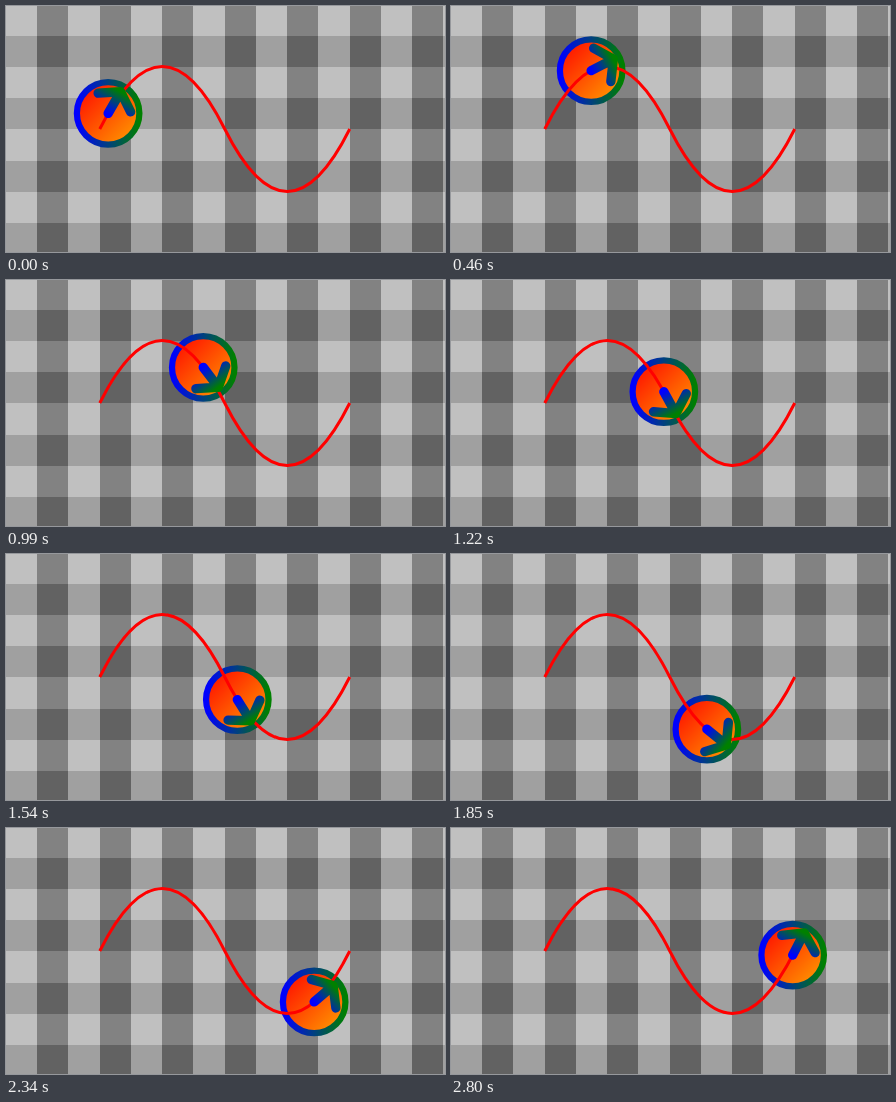
Recreate the animation shown at these times as an HTML page. Size 439 by 246 pixels, loop 2.87 s.

```html
<!DOCTYPE html>
<html lang="en">
<head>
<meta charset="utf-8">
<title>Marker following a path</title>
<style>
  html, body { margin: 0; width: 100%; height: 100%; overflow: hidden; }
  svg {
    display: block;
    width: 100%;
    height: 100%;
    background:
      repeating-linear-gradient(90deg, #000 0 31.25px, #3e3e3e 0 62.5px),
      repeating-linear-gradient(#000 -1.7px 29.55px, #202020 0 60.8px),
      #c0c0c0;
    background-blend-mode: difference;
  }
</style>
</head>
<body>
<svg viewBox="0 0 439 246" preserveAspectRatio="none">
  <defs>
    <linearGradient id="warm" x2="1" y2="1">
      <stop stop-color="red"/>
      <stop offset="1" stop-color="orange"/>
    </linearGradient>
    <linearGradient id="cool">
      <stop stop-color="blue"/>
      <stop offset="1" stop-color="green"/>
    </linearGradient>
  </defs>
  <circle id="disc" r="31.25" fill="url(#warm)" stroke="url(#cool)" stroke-width="6.25"/>
  <path id="track" d="M93.75 123 q62.5 -125 125 0 t125 0" fill="none" stroke="red" stroke-width="3"/>
  <path id="arrow" d="M0 0 H25 M12.5 -18.75 L25 0 L12.5 18.75" fill="none" stroke="url(#cool)"
        stroke-width="9.375" stroke-linecap="round" stroke-linejoin="round"/>
</svg>
<script>
  const LOOP = 2870, STEPS = 37, LEAD = 24;
  const FIRST = 0.048, STRIDE = 0.0261;

  const [disc, track, arrow] = ['disc', 'track', 'arrow'].map(id => document.getElementById(id));
  const length = track.getTotalLength();
  const start = performance.now();

  function place(fraction) {
    const distance = fraction * length;
    const point = track.getPointAtLength(distance);
    const back = track.getPointAtLength(distance - 0.5);
    const ahead = track.getPointAtLength(distance + 0.5);
    const angle = Math.atan2(ahead.y - back.y, ahead.x - back.x) * 180 / Math.PI;
    const move = `translate(${point.x} ${point.y})`;
    disc.setAttribute('transform', move);
    arrow.setAttribute('transform', `${move} rotate(${angle})`);
  }

  // The marker advances in equal steps; the first one is cut short by LEAD.
  function draw() {
    const time = Math.max(0, performance.now() - start) % LOOP;
    const step = Math.min(STEPS - 1, Math.floor((time + LEAD) * STEPS / LOOP));
    place(FIRST + STRIDE * step);
    requestAnimationFrame(draw);
  }
  draw();
</script>
</body>
</html>
```
